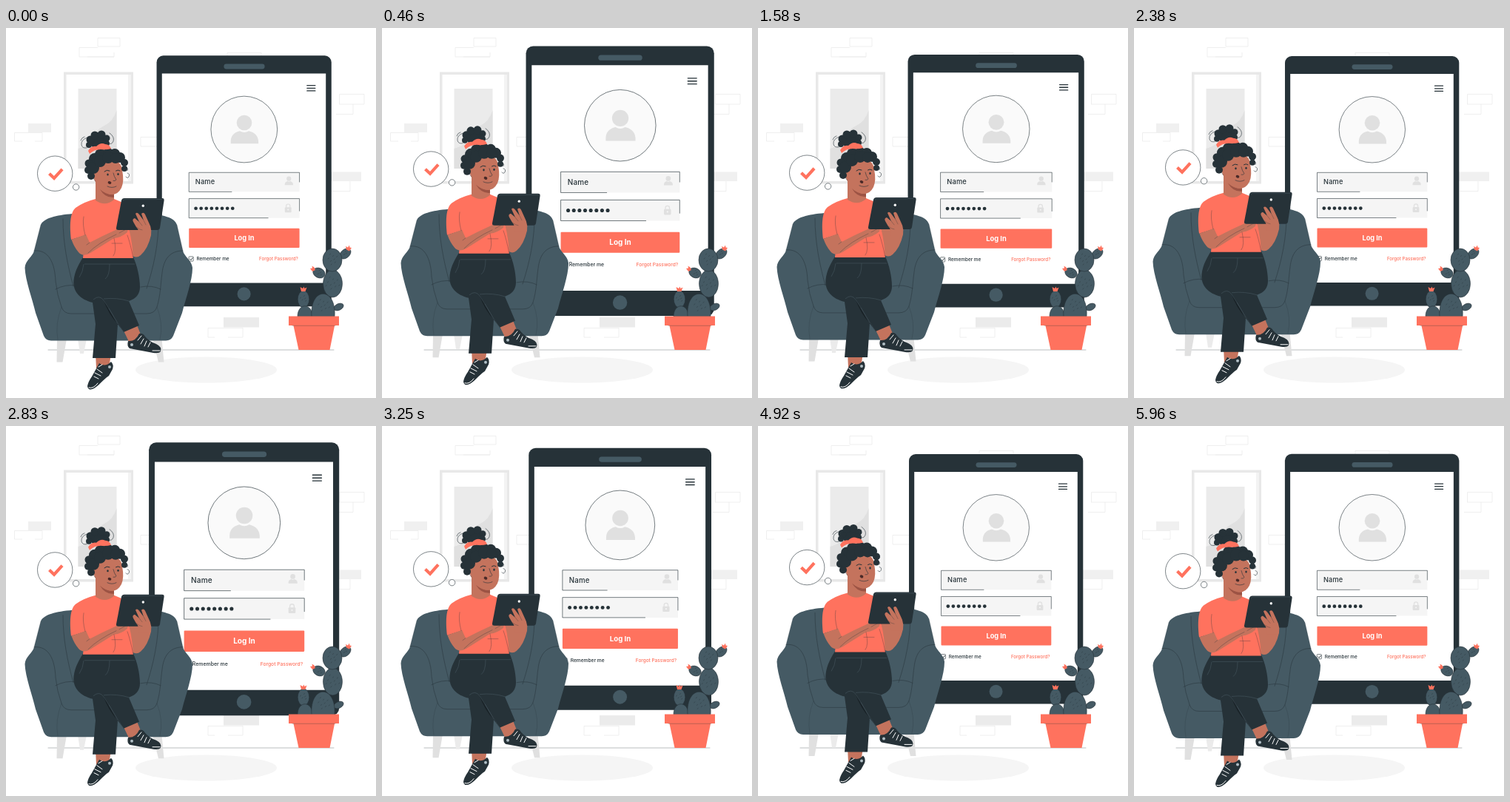
An HTML page that plays this animation: 500 by 500 pixels, repeating every 6000 ms.

```html
<!DOCTYPE html>
<html lang="en">
<head>
<meta charset="utf-8">
<title>Log in</title>
<style>
  html, body { margin: 0; width: 100%; height: 100%; overflow: hidden; background: #fff; }
  svg { display: block; width: 100%; height: 100%; }
  text { font-family: Inter, "Open Sans", sans-serif; font-weight: 500; fill: #263238; }
  .dark { fill: #263238; }
  .slate { fill: #455a64; }
  .coral { fill: #ff725e; }
  .skin { fill: #c4735d; }
  .pale { fill: #e0e0e0; }
  .mist { fill: #f0f0f0; }
  .line { fill: none; stroke: #263238; stroke-width: .6; stroke-linecap: round; stroke-linejoin: round; }
  .edge { stroke: #263238; stroke-width: .6; }
  .brick { fill: none; stroke: #e8e8e8; stroke-width: .7; }
  .lace { fill: none; stroke: #fff; stroke-width: 1; stroke-linecap: round; }
</style>
</head>
<body>
<svg viewBox="0 0 500 500">
  <!-- wall and floor -->
  <g class="brick">
    <path d="M124 25V13.500H154V25H124M146 39H99V26.500H124M110 39H146V33"/>
    <path d="M49 141.500V153H39M22 153H11.500V141.500H49M182 147.500H210V160H182Z"/>
    <path d="M299 45V33.500H345V45M450.500 103V89.500H484V103H450M469 103V116.500H446M465 207V220.500H440"/>
    <path d="M320 405.500H273V418H282M320 405V418H300"/>
  </g>
  <path class="mist" d="M30 129H61V141H30ZM436 194.500H480V207H436Z"/>
  <path fill="#ebebeb" d="M294 391H342V404.500H294Z"/>
  <path fill="#e8e8e8" d="M78 59.500H172V210.500H78Z"/>
  <path fill="#fff" d="M81.500 63H165.500V207H81.500Z"/>
  <path fill="#f3f3f3" d="M165.500 63H169V207H165.500Z"/>
  <path fill="#ebebeb" d="M97.500 82H149.500V190H97.500Z"/>
  <path fill="#e0e0e0" d="M149.500 111Q145 127 131 133Q122 137 116 153Q108 160 97.500 163V190H149.500Z"/>
  <path class="line" d="M57 435H443" opacity=".55"/>
  <ellipse cx="270.500" cy="462" rx="95.500" ry="17.500" fill="#f5f5f5"/>

  <g id="phone">
    <rect class="dark" x="204" y="38" width="235.300" height="337.500" rx="9"/>
    <path fill="#fff" d="M211.200 62H431.800V344H211.200Z"/>
    <rect class="slate" x="294.500" y="49.200" width="55" height="6.800" rx="3.400"/>
    <circle class="slate" cx="321.600" cy="358.800" r="9"/>
    <path class="line" style="stroke-width:1.300" d="M406.500 78.200H417.500M406.500 81.800H417.500M406.500 85.400H417.500"/>
    <circle class="edge" cx="321.800" cy="137.300" r="44.700" fill="#fafafa"/>
    <g id="user" class="pale">
      <circle cx="322" cy="128.300" r="10.300"/>
      <path d="M303.800 156.500V153C304 144 311 140.500 316 139.500Q322 143 328 139.500C333 140.500 340.500 144 341 153V156.500Z"/>
    </g>
    <path fill="#f5f5f5" d="M247.500 195.300H396.300V221.300H247.500ZM247.500 230.500H396.300V256.500H247.500Z"/>
    <path class="line" d="M305 221.300H247.500V195.300H396.300V208M354 256.500H247.500V230.500H396.300V247"/>
    <text x="256" y="211.300" font-size="9.200" letter-spacing=".2">Name</text>
    <use href="#user" transform="translate(285.400 165.200) scale(.3)"/>
    <g id="dots" class="dark"></g>
    <rect class="pale" x="376.600" y="242" width="8.800" height="7" rx="1"/>
    <path d="M378.400 243V240.500A2.600 2.600 0 0 1 383.600 240.500V243" fill="none" stroke="#e0e0e0" stroke-width="1.200"/>
    <circle cx="381" cy="245.300" r="1" fill="#f5f5f5"/>
    <rect class="coral" x="247.500" y="270.600" width="148.800" height="26" rx="1"/>
    <text x="322" y="286.900" font-size="9.200" text-anchor="middle" style="font-weight:700;fill:#fff">Log In</text>
    <rect class="edge" x="247.300" y="308.500" width="6.200" height="6.200" rx=".8" fill="#fff"/>
    <path class="line" style="stroke-width:.9" d="M248.800 311.800L250.200 313.300L252.500 310.200"/>
    <text x="257.800" y="313.800" font-size="6.350">Remember me</text>
    <text x="394.500" y="313.800" font-size="6.150" text-anchor="end" style="fill:#ff725e">Forgot Password?</text>
  </g>

  <!-- cactus -->
  <g class="slate edge">
    <ellipse cx="458.500" cy="305" rx="8.500" ry="5.800" transform="rotate(-40 458.500 305)"/>
    <ellipse cx="423" cy="331" rx="8.500" ry="6.500" transform="rotate(25 423 331)"/>
    <ellipse cx="449.500" cy="377" rx="7" ry="4.300" transform="rotate(-25 449.500 377)"/>
    <ellipse cx="441.500" cy="345.500" rx="13" ry="18.500"/>
    <ellipse cx="441" cy="313.500" rx="13" ry="15.500"/>
    <ellipse cx="402" cy="366.500" rx="7.800" ry="11.500"/>
    <path d="M394 390C394 371 414 371 414 390Z"/>
    <path d="M413 390C410 349 447 349 444 390Z"/>
  </g>
  <path class="coral" d="M399 356L397.500 350L401 352L402.500 349.500L403.500 352L406.500 350.500L404.500 356ZM414 329L411 325L414 324.500L413.500 321.500L416.500 323.500L418 327ZM460 299.500L459 295L462 296.500L464 293.500L464.500 296.500L467 297L464 301.500Z"/>
  <g id="spines" class="line" opacity=".7"></g>
  <path class="coral" d="M388 400H444.500L437.500 435H395.500ZM382 389.500H450V402H382Z"/>
  <path class="line" d="M387 402.300H445" opacity=".5"/>

  <g id="sitter">
    <!-- thought bubble -->
    <g class="edge" fill="#fff">
      <circle cx="66.200" cy="196.700" r="23.700"/>
      <circle cx="94.600" cy="215" r="4.200"/>
    </g>
    <path d="M58.500 196.800L65 203L76 190.800" fill="none" stroke="#ff725e" stroke-width="4.200"/>

    <!-- armchair -->
    <path fill="#ebebeb" d="M97 420H109L105 440H100Z"/>
    <path class="pale" d="M69 420H82L76.500 451.500H68.500ZM198 420H210.500L213.500 451.500H206Z"/>
    <path class="slate" d="M47 266C51 257 67 253 90 251H190C212 252 228 256 231 266L239 301C241 309 251 314 252 324C252 341 243 365 238 385L226 416Q223 422.500 216 422.500H61Q54 422.500 51 416L40 385C36 367 26 341 25.500 324C26 314 36 309 38 301Z"/>
    <g class="line" opacity=".8">
      <path d="M38 301C58 299 66 318 67 342Q69 361 75 377Q78 386 88 386H190Q201 386 204 377C209 361 209 344 211 331C213 313 221 301 239 301"/>
      <path d="M77 258C77 290 83 320 91 349M206 256C207 290 199 325 190 352M67 353Q80 346 95 348M182 350Q197 347 209 353"/>
      <path d="M38 301L47 266M239 301L231 266M75 377Q66 400 70 421M204 377Q213 400 208 421" opacity=".45"/>
    </g>

    <!-- legs -->
    <path class="skin" d="M121 440H142L139 460L122 460ZM157 405L176 399L184 419L168 428Z"/>
    <path class="dark" d="M104 310H172C177 320 181 337 181 350Q181 364 166 369L180 402L159 411L151 400L148 446H117L121 400L117 371C101 367 90 357 91.500 341C93 328 99 318 104 310Z"/>
    <path fill="#192227" d="M131 366L159 410L151 400Q139 388 131 366Z"/>
    <g fill="none" stroke="#46565e" stroke-width=".6">
      <path d="M159 411L132 368Q126 360 118 367M151 400L139 379M166 369Q150 364 132 366M106 319H174M140 319Q140 335 134 339M99 337Q104 330 105 319"/>
    </g>
    <path class="dark" d="M126 453Q134 459 142 451Q146 455 144 461L139 470C130 476 126 483 119 487Q111 491 110 484Q111 478 116 471ZM165 423Q175 424 180 413Q185 412 188 417Q194 424 203 427Q211 431 209 437Q207 440 199 439L167 433Q163 430 165 423Z"/>
    <path class="lace" d="M119 471L125 474M120 466L128 470M123 461L130 466M125 458L130 455M112 486Q118 488 124 480M182 427L186 420M187 430L190 423M192 431L195 425M178 422L183 416M198 436L208 436"/>
    <circle cx="140" cy="458" r="2" fill="#b0bec5"/>
    <circle cx="170" cy="428" r="2" fill="#b0bec5"/>

    <!-- body -->
    <path class="skin" d="M157 280L190 256Q198 266 196 280Q192 298 182 307Q175 313 168 305Z"/>
    <path class="coral" d="M121 231Q133 240 146 231L158 236L163 262Q170 280 172 311H104L107 280L88 286C86 268 86 250 94 243Q105 235 121 231Z"/>
    <path class="skin" d="M121 207H146V232Q134 242 121 233Z"/>
    <path fill="#9c5344" d="M127 218Q136 226 146 225V229Q134 230 127 218Z"/>
    <path class="skin" d="M88.500 286L108 279L113 290Q130 281 148 273Q157 265 166 266L164 276Q156 283 146 284L114 304Q104 310 98 303Q92 296 88.500 286Z"/>
    <path class="line" opacity=".55" d="M107 280Q103 265 105 255M111 304Q125 290 149 279M146 284Q150 302 145 308M143 291H157M153 277L164 271M172 311Q168 291 164 280M113 290L109 293"/>
    <path class="dark" d="M160 230H211Q214 230 213.600 233L208 270Q207.500 273 204.500 273H152Q148.500 273 149 270L156 233Q156.800 230 160 230Z"/>
    <path class="line" style="stroke:#46565e" d="M158 233Q159 231.500 161 231.500H211"/>
    <circle cx="185.300" cy="240.300" r="1.700" fill="#fff"/>
    <path class="skin" d="M172 262Q170 258 174 257L180 262L175 251Q177 248 180 252L186 260L183 251Q186 248 188 252L193 263Q198 272 195 282L179 282Q181 274 176 269Z"/>
    <path class="line" opacity=".5" d="M180 262L184 267M186 260L189 266M176 269Q181 273 184 273"/>

    <!-- head -->
    <path class="skin" d="M119 194Q122 178 140 177Q156 179 157 192Q160 207 156 216Q151 226 141 225Q128 222 122 210Q117 203 119 194Z"/>
    <g id="hair" class="dark"></g>
    <path class="coral" d="M111 166Q115 159 122 160Q128 154 134 157Q140 157 142 163Q136 165 128 164Q119 164 113 170Z"/>
    <path class="line" d="M110 148Q101 151 102 158Q103 163 109 162M106 147Q102 148 101 152M140 142Q147 147 145 153Q143 158 139 156M164 196Q168 197 166 201Q164 204 162 201M163 188Q166 190 164 193"/>
    <ellipse class="dark" cx="137.500" cy="198" rx="1.200" ry="1.600"/>
    <ellipse class="dark" cx="151.500" cy="197.500" rx="1.200" ry="1.600"/>
    <path class="line" style="stroke-width:1" d="M133 194Q136 191 140 193M148.500 193Q151.500 191 154 193"/>
    <path class="line" d="M145 196Q146 201 149 205Q148 207 145 206.500M137 214Q143 217 149 214"/>
    <ellipse cx="140" cy="209" rx="2.400" ry="1.900" fill="#4a2a28" transform="rotate(20 140 209)"/>
    <path class="line" opacity=".6" d="M119 200Q117 205 121 207"/>
  </g>
</svg>
<script>
const el = id => document.getElementById(id);
const circles = list => list.map(([x, y, r]) => `<circle cx="${x}" cy="${y}" r="${r}"/>`).join('');

el('dots').innerHTML = circles(Array.from({ length: 8 }, (_, i) => [256.800 + i * 7.070, 243.600, 2.350]));

el('hair').innerHTML = circles([
  [124, 154, 10], [114, 151, 5.500], [120, 145, 5.500], [129, 144, 5.500], [136, 149, 4.500], [112, 158, 4], [135, 156, 5],
  [120, 177, 8], [128, 171, 8], [138, 169, 7], [147, 170, 7], [154, 175, 7], [160, 182, 5], [160, 190, 4],
  [112, 183, 5.500], [111, 192, 5], [115, 200, 5], [118, 189, 8], [127, 180, 8], [138, 175, 8], [148, 176, 7]
]);

// small spines scattered over the cactus balls: centre x, centre y, spread
el('spines').innerHTML = [[441, 313, 8], [441, 345, 10], [428, 375, 9], [402, 366, 5], [423, 331, 4], [458, 305, 3]]
  .map(([x, y, r]) => Array.from({ length: r }, (_, i) => {
    const a = i * 2.400, d = r * Math.sqrt((i + .5) / r);
    return `<path d="M${x + d * Math.cos(a)} ${y + d * Math.sin(a)}l1.200 -1"/>`;
  }).join('')).join('');

const LOOP = 6000, FLOAT = 1500, RISE = 10, GROWTH = .1;
const beats = [[-57, 976, 2010], [2380, 3050, 3720], [5943, 6976, 8010]]; // start, peak, end

// cubic-bezier(.25, .1, .25, 1)
function ease(x) {
  let lo = 0, hi = 1, u = .5;
  for (let i = 0; i < 24; i++) {
    u = (lo + hi) / 2;
    const bx = .75 * u * (1 - u) + u ** 3;
    if (bx < x) lo = u; else hi = u;
  }
  return .3 * u * (1 - u) ** 2 + 3 * u * u * (1 - u) + u ** 3;
}

function pulse(t) {
  const beat = beats.find(([start, , end]) => t >= start && t < end);
  if (!beat) return 0;
  const [start, peak, end] = beat;
  return t < peak ? ease((t - start) / (peak - start)) : 1 - ease((t - peak) / (end - peak));
}

const origin = performance.now();
function draw() {
  const t = Math.max(0, performance.now() - origin) % LOOP;
  const lift = RISE * (1 - Math.abs(1 - t % FLOAT / FLOAT * 2));
  el('sitter').setAttribute('transform', `translate(0 ${-lift})`);
  el('phone').setAttribute('transform',
    `translate(321.700 206.900) scale(${1 + GROWTH * pulse(t)}) translate(-321.700 -206.900)`);
  requestAnimationFrame(draw);
}
draw();
</script>
</body>
</html>
```
